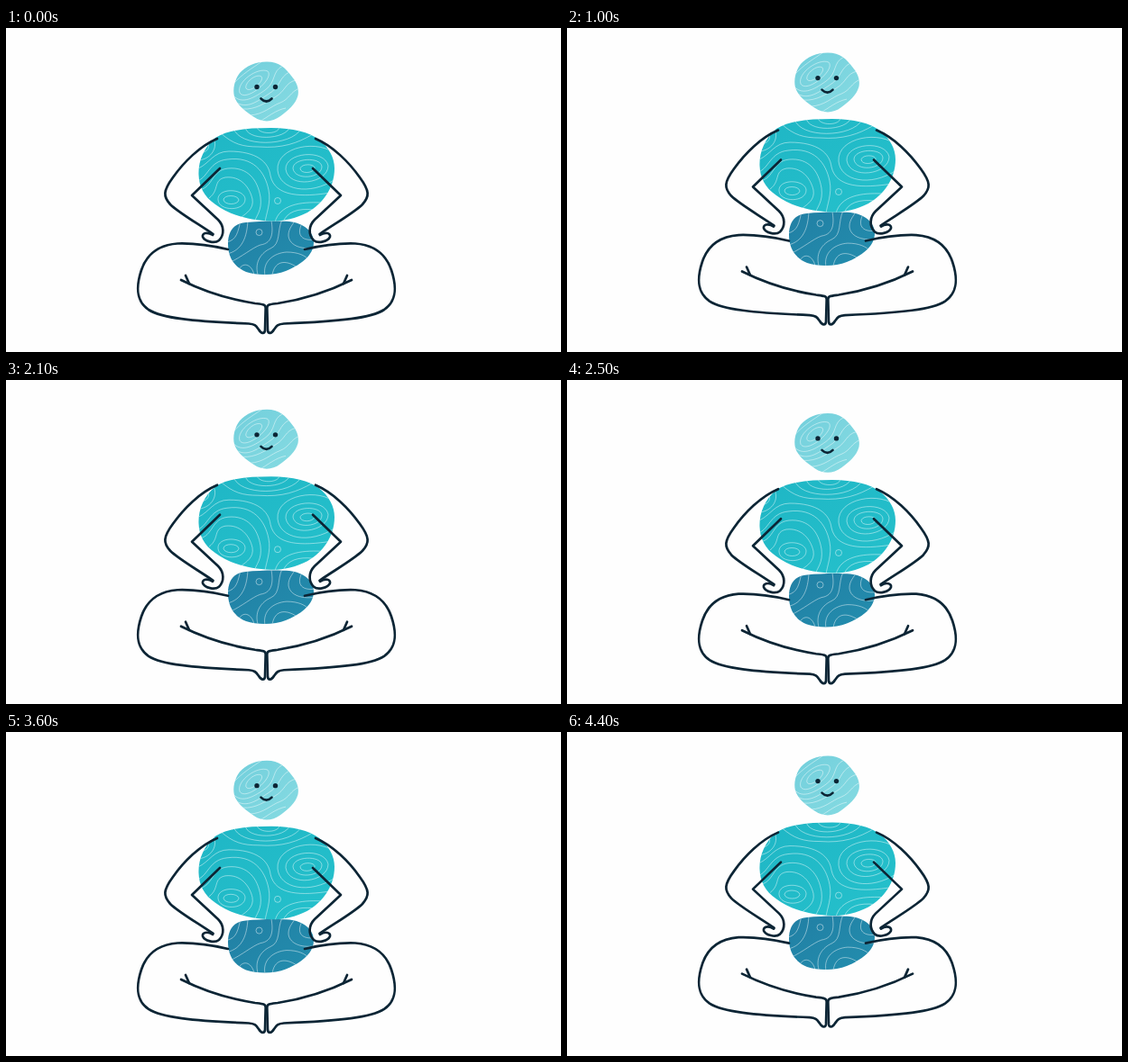
Animation of 615x360 px, one loop 4500 ms. Source, as an HTML page:

```html
<!DOCTYPE html>
<html lang="en">
<head>
<meta charset="utf-8">
<title>Breathing figure</title>
<style>
  html, body { margin: 0; width: 100%; height: 100%; overflow: hidden; background: #fefefe; }
  svg { display: block; width: 615px; height: 360px; }
  .ink { fill: none; stroke: #0c2535; stroke-width: 2.7; stroke-linecap: round; stroke-linejoin: round; }
  .contour { fill: none; stroke: #fff; stroke-opacity: .5; stroke-width: .9; }
</style>
</head>
<body>
<svg viewBox="0 0 615 360">
  <defs>
    <path id="headShape" d="M289 37.5C303 37.5 310 45 316 53C322 60 325 67 323.5 75C321 85 312 92 304 98C295 105 284 105 275 99C266 93 256 86 253 76C251 68 253 58 259 50C266 42 277 37.5 289 37.5Z"/>
    <path id="chestShape" d="M213.5 163C213 148 219 133 232 122C246 113 268 111 294 111C318 111 336 116 347 124C358 133 364 144 364 156C364 178 351 195 334 205C320 212 306 215 293 214.5C270 214 246 207 232 196C219 187 214 176 213.5 163Z"/>
    <path id="bellyShape" d="M246 240C246 226 252 217 266 216C280 214.5 300 214 314 215C330 217 341 226 341 238C341 255 322 265 310 270C298 275 278 275 266 271C252 265 246 254 246 240Z"/>
    <clipPath id="headClip"><use href="#headShape"/></clipPath>
    <clipPath id="chestClip"><use href="#chestShape"/></clipPath>
    <clipPath id="bellyClip"><use href="#bellyShape"/></clipPath>
    <linearGradient id="headFill" x2="1" y2="1"><stop stop-color="#72cfdc"/><stop offset="1" stop-color="#86dbe2"/></linearGradient>
    <linearGradient id="chestFill" x2="1" y2="1"><stop stop-color="#1fb6c5"/><stop offset="1" stop-color="#25c1cc"/></linearGradient>
    <linearGradient id="bellyFill" x2="1" y2="1"><stop stop-color="#217fa4"/><stop offset="1" stop-color="#238eae"/></linearGradient>
    <g id="limb">
      <path d="M234 123C215 131 197 149 185 166C174 181 174 187 182 196C191 205 212 217 229.5 229"/>
      <path d="M229 230C223 226 217 228 218 232C220 237 231 240 236 236C242 230 242 220 235 213L206 186L237 156"/>
      <path d="M246 246C225 241 205 239 190 239.5C170 241 156 251 150 269C143 290 145 304 158 313C172 322 205 326 269 328.5C276 329 277 331 280 335C283 340 286.5 340 287 336L287.7 311C287.7 307 284 307 276 306C250 302 220 293 194 280"/>
      <path d="M199 275L203 284"/>
    </g>
  </defs>

  <g id="belly">
    <use href="#bellyShape" fill="url(#bellyFill)"/>
    <g class="contour" clip-path="url(#bellyClip)">
      <circle cx="280.500" cy="227" r="3.500"/>
      <path d="M244 238C256 236 257 226 260 214M245 251C262 247 267 232 268 214M247 261C262 254 273 244 282 241C296 239 296 226 294 214M257 270C262 259 272 262 275 274M279 274C275 259 284 249 293 245C305 240 300 225 306 213M287 275C284 260 296 250 311 249C324 249 332 253 336 258M295 275C297 260 308 256 323 266M343 244C325 247 313 240 313 230C313 223 318 218 321 213M343 235C329 237 321 231 328 217"/>
    </g>
  </g>

  <g id="chest">
    <use href="#chestShape" fill="url(#chestFill)"/>
    <g class="contour" clip-path="url(#chestClip)">
      <path d="M278 109C278 119 304 119 303 109M265 109C265 126 311 125 315 109M252 111C258 133 316 132 327 112M238 117C252 129 262 132 280 132C306 134 323 128 340 118"/>
      <path d="M326 156C328 150 343 151 342 156C340 162 326 162 326 156ZM318 156C318 144 349 143 350 154C350 167 320 170 318 156ZM310 157C309 138 353 134 357 153C357 173 313 179 310 157ZM301 158C299 131 348 123 366 141M301 158C303 180 336 187 365 168"/>
      <path d="M241 191C241 185 257 185 258 191C257 197 242 197 241 191ZM235 191C234 177 264 178 265 190C265 204 236 204 235 191ZM225 189C237 180 229 169 243 166C260 164 270 177 273 190C275 201 266 206 261 210M214 180C230 177 227 158 246 156C268 154 279 169 282 188C284 203 277 209 275 216M212 170C224 166 225 148 245 146C274 142 287 160 291 180C294 194 288 207 287 216"/>
      <path d="M213 156C225 151 230 137 247 137C278 137 291 149 293 164C298 188 328 188 360 183M214 147C228 145 236 132 229 120M219 138C225 136 226 130 223 127"/>
      <circle cx="301" cy="192" r="3.500"/>
      <path d="M298 216C303 196 327 193 349 194M307 216C311 204 324 200 341 202"/>
    </g>
  </g>

  <g id="head">
    <use href="#headShape" fill="url(#headFill)"/>
    <g class="contour" clip-path="url(#headClip)">
      <path d="M266 67C264 61 277 50 283 54C287 59 270 73 266 67ZM259 72C255 60 279 43 290 48C298 56 266 83 259 72ZM251 74C261 87 277 76 287 69C300 60 294 48 307 42M252 62C262 51 272 45 284 37M254 82C267 91 279 81 290 74C305 65 302 55 314 49M262 90C277 91 287 83 298 77C310 70 309 61 321 58M270 97C286 96 293 87 304 83C314 79 315 71 325 67M281 104C290 99 299 91 310 89"/>
    </g>
    <g fill="#0c2535"><circle cx="278" cy="65.500" r="2.700"/><circle cx="298.500" cy="65.500" r="2.700"/></g>
    <path class="ink" d="M282.500 78.500Q288.500 84.500 294.500 78.500"/>
  </g>

  <g id="limbs" class="ink">
    <use href="#limb"/>
    <use href="#limb" transform="matrix(-1 0 0 1 577 0)"/>
  </g>
</svg>
<script>
  const LOOP = 4500, BREATH = 3000, STEP = 100, RISE = 11.5;
  // Each part follows the same breath, ahead by its own lead in ms.
  const parts = [["limbs", 100], ["head", 200], ["chest", 250], ["belly", 300]]
    .map(([id, lead]) => ({ el: document.getElementById(id), lead }));

  const lift = t => RISE / 2 * (1 - Math.cos(2 * Math.PI * t / BREATH));

  function draw() {
    const t = Math.floor(performance.now() % LOOP / STEP) * STEP;
    for (const { el, lead } of parts) {
      const y = lift(lead) - lift(t + lead);
      el.setAttribute("transform", `translate(0 ${y.toFixed(2)})`);
    }
    requestAnimationFrame(draw);
  }
  draw();
</script>
</body>
</html>
```
